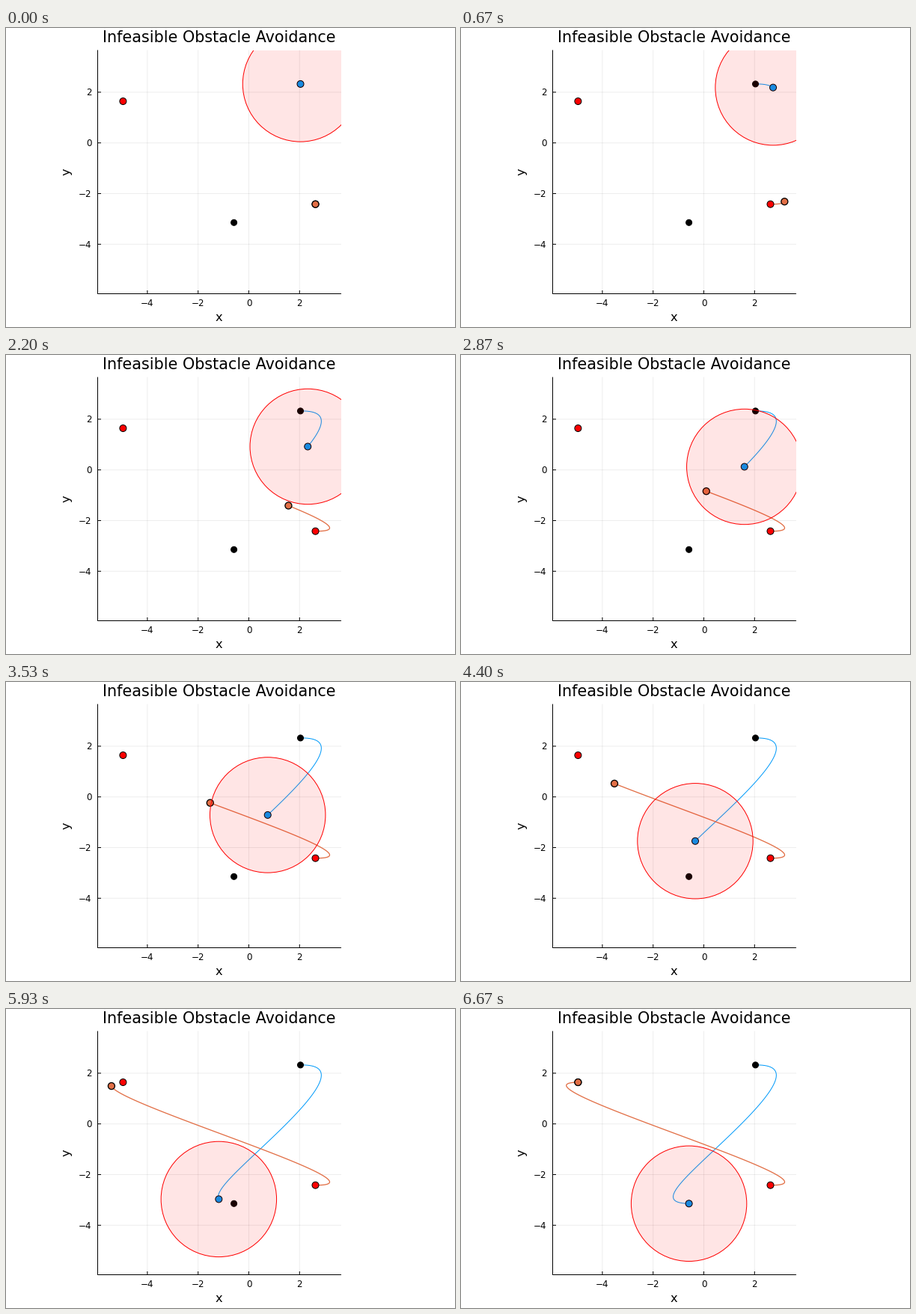
A matplotlib script for the animation above (6.74 s loop, 600 px wide and 400 px high).

```python
import numpy as np
import matplotlib.pyplot as plt
from matplotlib.animation import FuncAnimation
from matplotlib.patches import Circle, Rectangle

W, H, DPI = 600, 400, 100
STEPS, FPS = 100, 15               # path steps, shown 15 per second
TICK, LOOP = 20, 6740              # ms
PX = 72 / DPI                      # one pixel in points
LEFT, RIGHT, TOP, BOTTOM = 122.5, 447.5, 30, 355.5
UNIT, X0, Y0 = 33.9, 324.5, 153.7  # pixels per unit, origin
SPEED = 10 * UNIT                  # end speed over the whole run
BLUE, ORANGE = "#009afa", "#e26f46"

s = np.linspace(0, 1, STEPS + 1)


def glide(start, end, speed, push=(0, 0)):
    """Least-effort cubic between two points, Euler-stepped, plus a smooth push."""
    gap = end - start
    lag = 3 * (gap - speed) / STEPS
    v0, v1 = speed - lag, speed + lag
    ease = s**2 * (3 - 2 * s)
    path = start + gap * ease + v0 * s * (1 - s)**2 - v1 * s**2 * (1 - s)
    return path + s**2 * (1 - s)**2 * (push[0] + push[1] * s)


blue_x = glide(393.5, 304.6, SPEED, (47, 110))
blue_y = glide(74.9, 260.3, 0, (-4, 110))
orange_x = glide(413.5, 156.4, SPEED)
orange_y = glide(235.7, 98.0, 0)

plt.rcParams["font.family"] = "DejaVu Sans"
fig = plt.figure(figsize=(W / DPI, H / DPI), dpi=DPI, facecolor="white")
ax = fig.add_axes([0, 0, 1, 1])
ax.set_xlim(0, W)
ax.set_ylim(H, 0)
ax.axis("off")


def line(xs, ys, color="black", z=1, width=1, **kw):
    return ax.plot(xs, ys, color=color, lw=width * PX, zorder=z, snap=False, **kw)[0]


def label(x, y, text, size, **kw):
    ax.text(x, y, text, fontsize=size * PX, **{"ha": "center", "va": "baseline", **kw})


def dot(x, y, color, z, r=4.5, width=1):
    return ax.add_patch(Circle((x, y), r, fc=color, ec="black", lw=width * PX, zorder=z))


for v in (-4, -2, 0, 2):
    x, y = X0 + v * UNIT, Y0 - v * UNIT
    name = str(v).replace("-", "\u2212")
    line([x, x], [TOP, BOTTOM], alpha=0.07)
    line([LEFT, RIGHT], [y, y], alpha=0.07)
    line([x, x], [BOTTOM, BOTTOM - 4], z=2)
    line([LEFT, LEFT + 4], [y, y], z=2)
    label(x, 371.5, name, 11.85)
    label(114.5, y + 4.3, name, 11.85, ha="right")

line([LEFT, LEFT, RIGHT], [TOP, BOTTOM, BOTTOM], z=2)
label(284.5, 18.6, "Infeasible Obstacle Avoidance", 20.8)
label(284.5, 392, "x", 16.3)
label(81, 192.3, "y", 16.3, rotation=90, va="center")

blue_line = line([], [], BLUE, 3)
orange_line = line([], [], ORANGE, 3, 1.3)
for xs, ys, color, r in ((blue_x, blue_y, "black", 4), (orange_x, orange_y, "red", 4.5)):
    for i in (0, -1):
        dot(xs[i], ys[i], color, 4, r)
blue_dot = dot(0, 0, BLUE, 5)
orange_dot = dot(0, 0, ORANGE, 5, width=1.3)

# The keep-out zone tints whatever lies under it.
frame = Rectangle((LEFT, TOP), RIGHT - LEFT, BOTTOM - TOP, transform=ax.transData)
zone = ax.add_patch(Circle((0, 0), 77.2, fc=(1, 0, 0, 0.1), ec="red", lw=PX, zorder=6))
zone.set_clip_path(frame)


def draw(n):
    # Steps change on the nearest 10 ms mark.
    k = min(int((n * TICK + 15) * FPS / 1000), STEPS)
    blue_line.set_data(blue_x[:k + 1], blue_y[:k + 1])
    orange_line.set_data(orange_x[:k + 1], orange_y[:k + 1])
    blue_dot.center = zone.center = blue_x[k], blue_y[k]
    orange_dot.center = orange_x[k], orange_y[k]
    return blue_line, orange_line, blue_dot, orange_dot, zone


anim = FuncAnimation(fig, draw, frames=LOOP // TICK, interval=TICK,
                     init_func=lambda: draw(0), repeat=True, repeat_delay=0)
plt.show()
```
